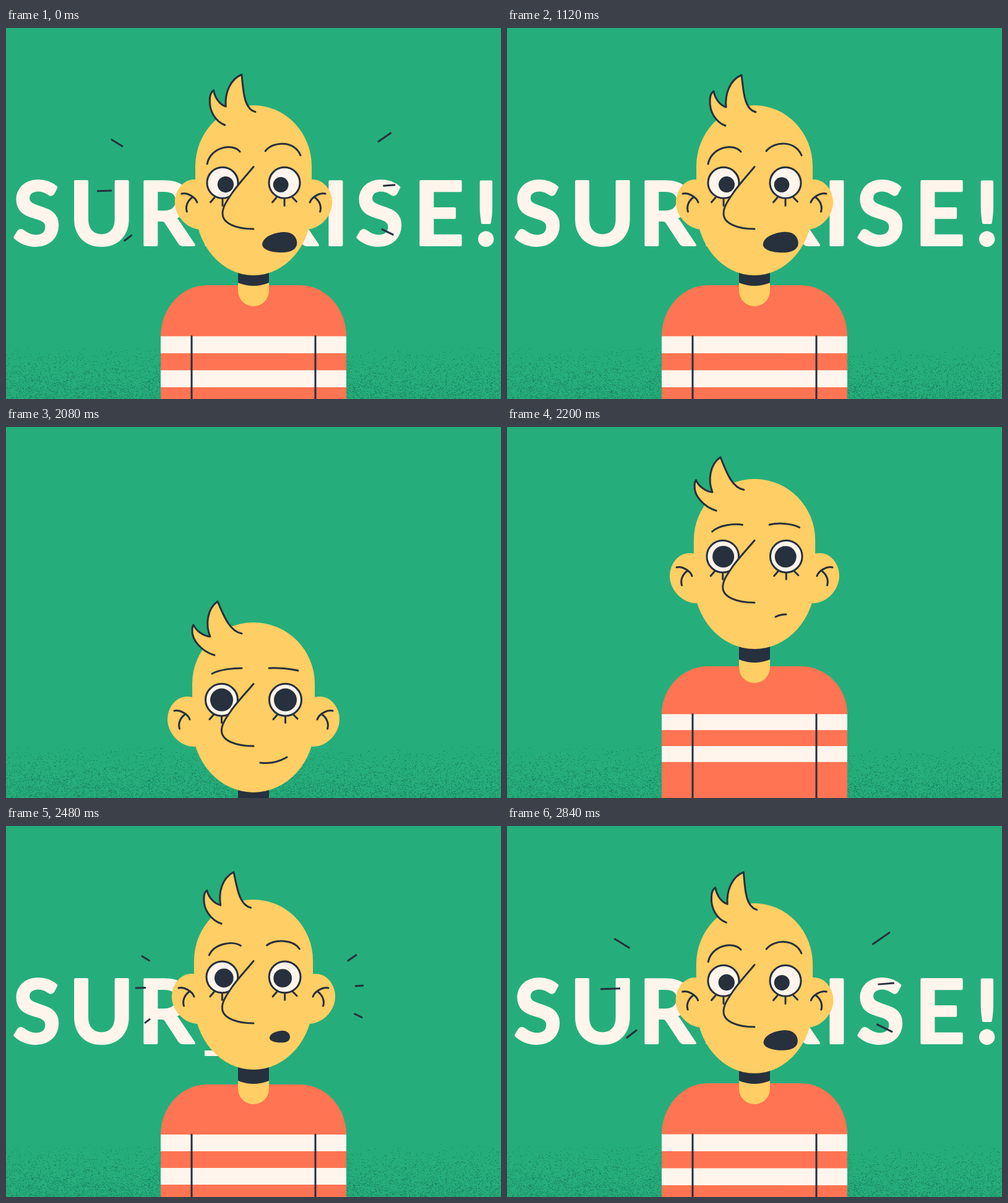
Recreate the animation shown at these times as an HTML page with a canvas. Size 800 px wide and 600 px high, loop 2880 ms.

```html
<!DOCTYPE html>
<html lang="en">
<head>
<meta charset="utf-8">
<title>Surprise!</title>
<style>
  html, body { margin: 0; width: 100%; height: 100%; overflow: hidden; background: #25ae7b; }
  canvas, svg { position: absolute; left: 0; top: 0; width: 800px; height: 600px; display: block; }
  .skin { fill: #ffce64; }
  .dark { fill: #27303d; }
  .cream { fill: #fff5ec; }
  .shirt { fill: #ff7452; }
  .line { fill: none; stroke: #27303d; stroke-width: 3; stroke-linecap: round; stroke-linejoin: round; }
  .inked { stroke: #27303d; stroke-width: 3; stroke-linecap: round; stroke-linejoin: round; }
  #rays line { stroke: #27303d; stroke-width: 3; }
  #word text {
    font: 700 141px Lato, "Open Sans", sans-serif;
    fill: #fff5ec; stroke: #fff5ec; stroke-width: 4; stroke-linejoin: round;
  }
</style>
</head>
<body>
<canvas id="grain" width="800" height="600"></canvas>
<svg viewBox="0 0 800 600">
  <defs>
    <g id="ear">
      <path class="skin" d="M45,123C40,120 35,120 30,120C12,121 0,139 0,157C0,179 20,202 45,201Z"/>
      <path class="line" d="M11,143C20,141 33,148 36,157M28,149C20,155 17,164 19.5,172"/>
    </g>
    <path id="lashes" class="line" d="M-13,24L-19.5,31.5M0,27V37M13,24L19.5,30.5"/>
  </defs>
  <g id="word"><rect id="cursor" class="cream" y="363" width="65" height="9"/></g>
  <g id="rays"></g>
  <g id="person">
    <path id="body" class="shirt"/>
    <rect id="stripe1" class="cream" x="250" width="300"/>
    <rect id="stripe2" class="cream" x="250" width="300"/>
    <path id="seams" class="line"/>
    <path id="neck" class="skin"/>
    <path id="shade" class="dark"/>
    <g id="head">
      <path id="skull" class="skin"/>
      <use id="earL" href="#ear"/>
      <use id="earR" href="#ear"/>
      <path id="hair" class="skin inked"/>
      <g id="eyeL"><use href="#lashes"/><circle class="cream inked"/><circle class="dark"/></g>
      <g id="eyeR"><use href="#lashes"/><circle class="cream inked"/><circle class="dark"/></g>
      <path id="nose" class="skin inked" d="M0,99.5C-15,117 -29,132 -36,142.5C-47,158 -51.5,166 -51.5,175C-51.5,192 -27,200 0,200"/>
      <path id="browL" class="line"/>
      <path id="browR" class="line"/>
      <path id="smile" class="line"/>
      <path id="mouth" class="dark" d="M-29,3C-28,-10 -7,-17 8,-17C21,-17 28,-8 28,1C28,11 18,16.5 3,16.5C-14,16.5 -29,12 -29,3Z"/>
    </g>
  </g>
</svg>
<script>
const LOOP = 2880, STEP = 40;
const $ = id => document.getElementById(id);
const set = (el, attrs) => { for (const k in attrs) el.setAttribute(k, attrs[k]); };
const make = (tag, parent) =>
  parent.appendChild(document.createElementNS('http://www.w3.org/2000/svg', tag));
const mix = (a, b, k) => a + (b - a) * k;

// Value of a [time, value] track at t
function track(keys, t) {
  if (t <= keys[0][0]) return keys[0][1];
  for (let i = 1; i < keys.length; i++) {
    const [t0, a] = keys[i - 1], [t1, b] = keys[i];
    if (t < t1) return mix(a, b, (t - t0) / (t1 - t0));
  }
  return keys[keys.length - 1][1];
}

// Blend two paths of equal structure
const NUM = /-?[\d.]+/g;
function morph([a, b], k) {
  const ends = b.match(NUM);
  let i = 0;
  return a.replace(NUM, v => mix(+v, +ends[i++], k).toFixed(2));
}

const headTop = [[2040, 480], [2080, 316], [2120, 190], [2160, 116], [2200, 84], [2240, 81],
  [2280, 86], [2320, 94], [2400, 109], [2480, 119], [2560, 123.5], [2640, 125]];
const neckDrop = [[2080, 336], [2200, 330], [2480, 331], [2640, 325]];
const collar = [[2080, 24], [2200, 27], [2480, 32], [2640, 34]];
const band = [[2080, 25.5], [2200, 25.8], [2480, 27], [2640, 27.5]];
const shock = [[2080, 0], [2200, .17], [2480, .58], [2560, .78], [2640, .88], [2720, .93], [2840, .97], [2920, 1]];
const sway = [[2080, 0], [2200, .08], [2320, .34], [2480, .7], [2520, .84], [2560, .96], [2640, 1.09],
  [2720, 1.13], [2840, 1.09], [2880, 1.05], [3040, .98], [3280, 1.01], [3440, 1]];
const rayHead = [[2400, 0], [2440, .16], [2480, .31], [2520, .43], [2600, .6], [2720, .78],
  [2840, .89], [2880, .93], [2960, .98], [3040, 1]];
const rayTail = [[2400, 0], [2440, .06], [2480, .14], [2640, .28], [2760, .43], [2840, .57],
  [2880, .69], [2920, .8], [2960, .9], [3000, .96], [3080, 1]];

const hair = [
  'M337,53C316,47 300,28 301,13C301,8 302,5 303,4C307,13 318,22 330,23C322,4 325,-22 342,-34C352,-10 362,15 381,18',
  'M353,33C337,27 327,10 328,-8C328,-16 331,-21 334,-23C336,-11 344,0 354,3C352,-18 360,-41 379,-49C382,-28 382,6 402,11'];
const browL = ['M333,83C345,76 368,74 381,74', 'M325,95C330,68 365,60 378,75'];
const browR = ['M425,74C440,73 460,75 472,78', 'M419,74C432,57 467,57 476,81'];
const smile = ['M411,227Q433,230 454,218', 'M434,223Q442,219 451,219'];

const rays = [
  [243.6, 225, 164.3, 176.7], [240, 261, 140, 264], [240.6, 306, 187, 347.6],
  [539.2, 227.2, 628.9, 165], [552.3, 260, 635, 253.2], [551, 297.7, 632, 337.4]
].map(ends => ({ ends, el: make('line', $('rays')) }));

// Letters are placed by the left edge of their ink
const lefts = [12, 110, 222, 321, 422, 521, 566, 668, 762];
const TYPE_START = 2360, TYPE_RATE = 50;
const pen = document.createElement('canvas').getContext('2d');
pen.font = '700 141px Lato, "Open Sans", sans-serif';
const letters = [...'SURPRISE!'].map((ch, i) => {
  const el = make('text', $('word'));
  el.textContent = ch;
  set(el, { x: lefts[i] + pen.measureText(ch).actualBoundingBoxLeft + 2, y: 351 });
  return el;
});

function drawGrain() {
  const ctx = $('grain').getContext('2d');
  let seed = 7;
  const rnd = () => (seed = seed * 16807 % 2147483647) / 2147483647;
  ctx.fillStyle = '#1d8a66';
  for (let i = 0; i < 9000; i++) {
    const x = Math.floor(rnd() * 800), y = Math.floor(512 + 88 * rnd() ** .45);
    ctx.fillRect(x, y, rnd() < .25 ? 2 : 1, 1);
  }
}

function drawWord(t) {
  const typed = t < TYPE_START ? 0 : Math.min(9, Math.floor((t - TYPE_START) / TYPE_RATE) + 1);
  letters.forEach((el, i) => set(el, { visibility: i < typed ? 'visible' : 'hidden' }));
  set($('cursor'), { x: lefts[typed] || 0, visibility: t >= 2320 && typed < 8 ? 'visible' : 'hidden' });
}

function drawRays(t) {
  const a = track(rayTail, t), b = track(rayHead, t);
  rays.forEach(({ ends: [x0, y0, x1, y1], el }) => set(el, {
    x1: mix(x0, x1, a), y1: mix(y0, y1, a), x2: mix(x0, x1, b), y2: mix(y0, y1, b),
    visibility: b > a ? 'visible' : 'hidden'
  }));
}

function drawEye(id, x, s, dx, dy, small) {
  const [, white, pupil] = $(id).children;
  set($(id), { transform: `translate(${x} 125.3)` });
  set(white, { r: 26 - s });
  set(pupil, { cx: dx * s, cy: dy * s, r: mix(18.5, small, s) });
}

function drawBody(top, t) {
  const n = top + track(neckDrop, t), b = n - track(collar, t), u = track(band, t);
  const chest = b + 3 * u;
  set($('body'), { d: `M250,800V${chest}A75,${3 * u} 0 0 1 325,${b}H475A75,${3 * u} 0 0 1 550,${chest}V800Z` });
  set($('stripe1'), { y: chest, height: u });
  set($('stripe2'), { y: chest + 2 * u, height: u });
  set($('seams'), { d: `M300,${chest}V800M500,${chest}V800` });
  set($('neck'), { d: `M375,${top + 200}V${n - 25}a25,25 0 0 0 50,0V${top + 200}Z` });
  set($('shade'), { d: `M375,${top + 200}V${n - 38}Q400,${n - 28} 425,${n - 38}V${top + 200}Z` });
}

function drawHead(top, t) {
  const s = track(shock, t), w = mix(99, 94, s), ear = mix(139, 127, s), eye = mix(51.5, 50, s);
  set($('head'), { transform: `translate(0 ${top})` });
  set($('skull'), { d: `M${400 - w},99A${w},99 0 0 1 ${400 + w},99V165A${w},110 0 0 1 ${400 - w},165Z` });
  set($('earL'), { transform: `translate(${400 - ear} 0)` });
  set($('earR'), { transform: `translate(${400 + ear} 0) scale(-1 1)` });
  set($('hair'), { d: morph(hair, track(sway, t)) });
  drawEye('eyeL', 400 - eye, s, 5, 2.8, 13);
  drawEye('eyeR', 400 + eye, s, -6, 3.2, 12.3);
  set($('nose'), { transform: `translate(400 0) scale(${1 - .03 * s} 1)` });
  set($('browL'), { d: morph(browL, s) });
  set($('browR'), { d: morph(browR, s) });
  const open = t >= 2240;
  set($('smile'), {
    d: morph(smile, Math.min(1, Math.max(0, (t - 2080) / 120))),
    visibility: open ? 'hidden' : 'inherit'
  });
  set($('mouth'), {
    transform: `translate(442.7 221.8) scale(${s})`,
    visibility: open ? 'inherit' : 'hidden'
  });
}

const CUT = 1920, ENTER = 2040;
const start = performance.now();
function frame() {
  const now = Math.max(0, performance.now() - start) % LOOP;
  const step = Math.floor(now / STEP) * STEP;
  const t = step < CUT ? step + LOOP : step;  // clock runs on from the cut
  const top = track(headTop, t);
  set($('person'), { visibility: t < ENTER ? 'hidden' : 'visible' });
  drawWord(t);
  drawRays(t);
  drawBody(top, t);
  drawHead(top, t);
  requestAnimationFrame(frame);
}

drawGrain();
frame();
</script>
</body>
</html>
```
